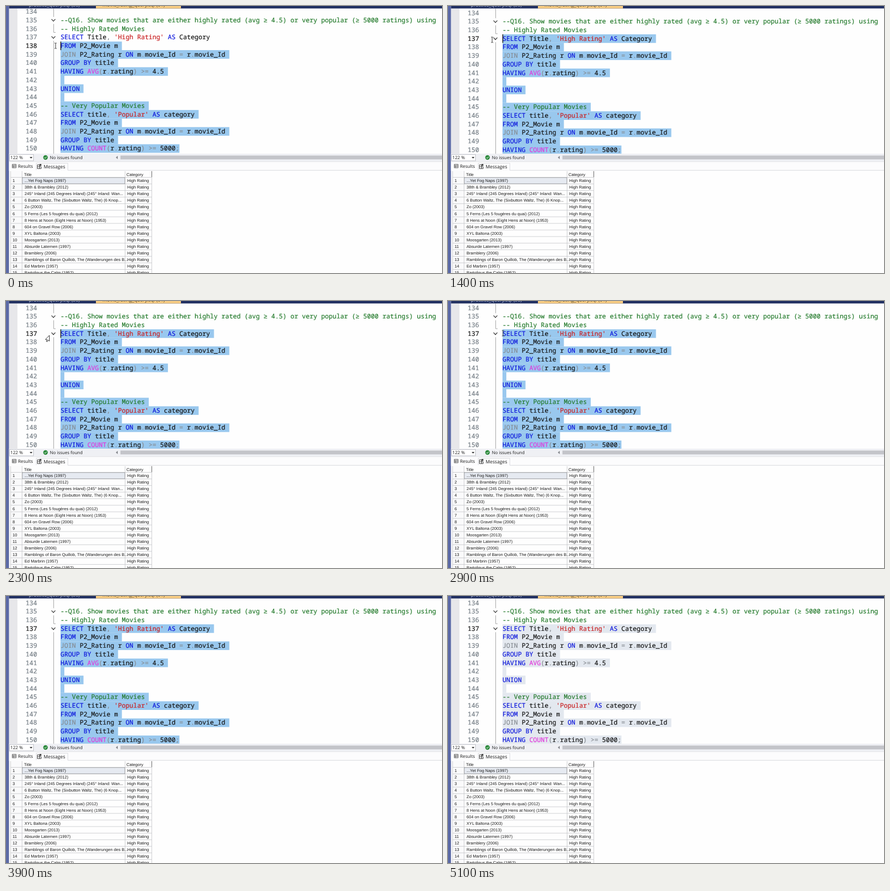
These frames come from a looping animation (800 by 490 pixels, 5.2 s). An HTML page:

```html
<!DOCTYPE html>
<html lang="en">
<head>
<meta charset="utf-8">
<title>Query editor</title>
<style>
html, body { margin: 0; width: 100%; height: 100%; overflow: hidden; background: #fff; }
svg { display: block; width: 800px; height: 490px; }
text { white-space: pre; text-rendering: geometricPrecision; }
.code { font: 500 11.73px "Noto Sans Mono", monospace; stroke-width: .2px; }
.ui { font-family: "Open Sans", sans-serif; fill: #1c1c1c; }
.cell { font: 7.6px "Liberation Sans", Arial, sans-serif; fill: #1a1a1a; }
</style>
</head>
<body>
<svg id="stage" viewBox="0 0 800 490"></svg>
<script>
const LOOP = 5200, ROW = 15.7, CHAR = 7.04, LEFT = 100, FIRST = 134, TOP = 2.45;
const stage = document.getElementById('stage');

const CODE = [
  '',
  '--Q16. Show movies that are either highly rated (avg ≥ 4.5) or very popular (≥ 5000 ratings) using',
  '-- Highly Rated Movies',
  "SELECT Title, 'High Rating' AS Category",
  'FROM P2_Movie m',
  'JOIN P2_Rating r ON m.movie_Id = r.movie_Id',
  'GROUP BY title',
  'HAVING AVG(r.rating) >= 4.5',
  '',
  'UNION',
  '',
  '-- Very Popular Movies',
  "SELECT title, 'Popular' AS category",
  'FROM P2_Movie m',
  'JOIN P2_Rating r ON m.movie_Id = r.movie_Id',
  'GROUP BY title',
  'HAVING COUNT(r.rating) >= 5000;'
];

const TITLES = [
  '...Yet Fog Naps (1997)',
  '38th & Brambley (2012)',
  '245° Inland (245 Degrees Inland) (245° Inland: Wan...',
  '6 Button Waltz, The (Sixbutton Waltz, The) (6 Knop...',
  'Zo (2003)',
  '5 Ferns (Les 5 fougères du quai) (2012)',
  '8 Hens at Noon (Eight Hens at Noon) (1953)',
  '604 on Gravel Row (2006)',
  'XYL Baltona (2003)',
  'Moosgarten (2013)',
  'Absurde Laternen (1997)',
  'Bramblery (2006)',
  'Ramblings of Baron Quillob, The (Wanderungen des B...',
  'Ed Marbrin (1957)',
  'Bartolinus the Calm (1952)'
];

function add(parent, tag, attrs, text) {
  const el = document.createElementNS('http://www.w3.org/2000/svg', tag);
  for (const k in attrs) el.setAttribute(k, attrs[k]);
  if (text !== undefined) el.textContent = text;
  parent.appendChild(el);
  return el;
}
const rect = (p, x, y, width, height, fill, more) =>
  add(p, 'rect', { x, y, width, height, fill, ...more });
const path = (p, d, stroke, more) =>
  add(p, 'path', { d, stroke, fill: 'none', ...more });
const label = (p, x, y, text, cls, more) =>
  add(p, 'text', { x, y, class: cls, ...more }, text);

const rowTop = i => TOP + i * ROW;

// Syntax colouring
const TOKEN = /(--.*)|('[^']*')|\b(SELECT|FROM|ON|AS|GROUP|BY|HAVING|UNION)\b|\b(AVG|COUNT)\b|(\d+\.\d+)|(\bJOIN\b|[.,()=>;]+)/g;
const COLORS = ['#237a2b', '#c92022', '#0c16dc', '#e236dc', '#151515', '#858a90'];

function codeLine(parent, i) {
  const line = CODE[i];
  const el = add(parent, 'text', { x: LEFT, y: rowTop(i) + 11.8, class: 'code' });
  const span = (s, c) => s && add(el, 'tspan', { fill: c, stroke: c }, s);
  let at = 0;
  for (const m of line.matchAll(TOKEN)) {
    span(line.slice(at, m.index), '#151515');
    span(m[0], COLORS[m.slice(1).findIndex(Boolean)]);
    at = m.index + m[0].length;
  }
  span(line.slice(at), '#151515');
}

// Editor
rect(stage, 0, 0, 800, 490, '#fefefe');
const clip = add(add(stage, 'defs', {}), 'clipPath', { id: 'editor' });
rect(clip, 0, 4.5, 800, 266.5);
const editor = add(stage, 'g', { 'clip-path': 'url(#editor)' });
rect(editor, 6, 4, 15, 268, '#e7e7ea');
const sheet = add(editor, 'g', {});

const marks = CODE.map((line, i) => {
  const len = line.length + (i < CODE.length - 1 ? 1 : 0);
  return rect(sheet, LEFT, rowTop(i), len * CHAR, ROW + .1);
});
path(sheet, 'M87.5 0V20M87.5 33V48.5H91M87.5 64V290', '#a6a6a6');
for (const i of [1, 3]) {
  const y = rowTop(i) + 6;
  path(sheet, `M83.5 ${y}l3.5 3.8l3.5 -3.8`, '#333', { 'stroke-width': 1.2 });
}
const numbers = CODE.map((_, i) =>
  label(sheet, 36, rowTop(i) + 11.8, FIRST + i, 'code'));
CODE.forEach((_, i) => codeLine(sheet, i));
const caret = rect(sheet, LEFT - .2, 0, 1.4, ROW, '#111');

// Pointers
const beam = path(editor, 'M-2 -5H-.6L0 -4.4L.6 -5H2M0 -4.4V4.4M-2 5H-.6L0 4.4L.6 5H2', '#333');
const arrow = path(editor, 'M3.6 -6V4.6L1.2 2.6L-.4 5.8L-2 5L-.5 1.9L-3.8 1.7Z', '#222',
  { fill: '#fff', 'stroke-width': .9 });

// Window frame and tab strip
rect(stage, 0, 0, 5.5, 490, '#5b69a5');
rect(stage, 5.5, 0, 794.5, 4.5, '#202f60');
rect(stage, 165, 0, 156, 4.5, '#f6cb82');
label(stage, 42, 1, 'practice_query.sql (58)', 'ui', { 'font-size': 9, style: 'fill:#cdd3e8' });
label(stage, 177, 1, 'movie_rating_query.sql (61)*', 'ui', { 'font-size': 9, style: 'fill:#4a3d22' });

// Status row
rect(stage, 5.5, 271, 794.5, 14.5, '#eff0f4');
rect(stage, 6.5, 272.5, 44, 11.5, '#fff', { stroke: '#b4b6be', 'stroke-width': .8 });
label(stage, 8, 281.3, '122 %', 'ui', { 'font-size': 8.2 });
path(stage, 'M43.5 277H48.5L46 280Z', 'none', { fill: '#333' });
add(stage, 'circle', { cx: 72.5, cy: 278, r: 4.2, fill: '#2c8a3c' });
path(stage, 'M70.4 278.1l1.5 1.6l2.7 -3.2', '#fff', { 'stroke-width': 1 });
label(stage, 80.5, 281.3, 'No issues found', 'ui', { 'font-size': 8 });
path(stage, 'M205 275V281L201.5 278Z', 'none', { fill: '#85878d' });
rect(stage, 210, 274.5, 590, 7, '#c3c4c9');

// Result tabs
rect(stage, 5.5, 285.5, 794.5, 17, '#fcfcfd');
path(stage, 'M5.5 285.7H800', '#d6d8de', { 'stroke-width': .7 });
path(stage, 'M55.5 301V288.5H113.5V301.5H800', '#d4d5da', { 'stroke-width': .8 });
path(stage, 'M11.5 290.5H18.5V297H11.5ZM11.5 292.6H18.5M11.5 294.8H18.5M14 292.6V297', '#444', { 'stroke-width': .8 });
label(stage, 22, 297, 'Results', 'ui', { 'font-size': 8.2 });
path(stage, 'M57.5 291.5H61.5V298.5H57.5ZM57.5 295H64.5V298.5H61.5', '#333', { 'stroke-width': .9 });
rect(stage, 61.5, 290, 3.4, 3.4, '#444');
label(stage, 69, 298, 'Messages', 'ui', { 'font-size': 8.7 });

// Result grid
const CELL = 12.07, GRID = 314.5;
rect(stage, 8, 303, 21, 187, '#fafafb');
rect(stage, 29.5, GRID, 188.5, CELL, '#e6eaf1');
label(stage, 33, 312, 'Title', 'cell');
label(stage, 221, 312, 'Category', 'cell');
path(stage, 'M8.5 303V490M29.5 303V490M218.5 303V490M267.5 314V490', '#c3c4c8', { 'stroke-width': .8 });
path(stage, 'M267.5 303V314', '#555', { 'stroke-width': .9 });
TITLES.forEach((title, i) => {
  const y = GRID + i * CELL, base = y + 8.7;
  path(stage, `M8 ${y}H267.5`, '#c3c4c8', { 'stroke-width': .8 });
  label(stage, 12, base, i + 1, 'cell');
  label(stage, 34, base, title, 'cell');
  label(stage, 222.5, base, 'High Rating', 'cell');
});
rect(stage, 30, GRID + .4, 188, CELL - .8, 'none',
  { stroke: '#444', 'stroke-width': .7, 'stroke-dasharray': '1 1' });

// Pointer path: time, x, y
const MOVES = [
  [0, 91, 73], [100, 91, 73], [700, 91, 19], [800, 91, 19], [1000, 88, 13],
  [1300, 81, 62], [2050, 81, 62], [2250, 76, 69], [2600, 76, 69],
  [3300, 139, 44], [3450, 139, 44], [3800, 175, -14], [LOOP, 175, -14]
];
const SCROLL_AT = 860, RELEASE = 2000, CARET_OFF = 2500, BLUR = 4900;

function pointer(t) {
  const i = MOVES.findIndex((m, k) => k && t < m[0]);
  const [t0, x0, y0] = MOVES[i - 1], [t1, x1, y1] = MOVES[i];
  const p = (t - t0) / (t1 - t0), e = p * p * (3 - 2 * p);
  return [x0 + (x1 - x0) * e, y0 + (y1 - y0) * e];
}

function draw(t) {
  const [x, y] = pointer(t);
  const scroll = t < SCROLL_AT ? 0 : 2.4;
  const start = t < RELEASE ? Math.floor((y - scroll - TOP) / ROW) : 3;
  const fill = t < BLUR ? '#99c8ee' : '#e3e8ef';

  sheet.setAttribute('transform', `translate(0 ${scroll})`);
  marks.forEach((m, i) => m.setAttribute('fill', i >= start ? fill : 'none'));
  numbers.forEach((n, i) => {
    const c = i === start ? '#111' : '#727b83';
    n.setAttribute('fill', c);
    n.setAttribute('stroke', c);
  });
  caret.setAttribute('y', rowTop(start));
  caret.setAttribute('visibility', t < CARET_OFF ? 'visible' : 'hidden');

  const overMargin = t > 2150 && x < 80;
  for (const [el, on] of [[beam, !overMargin], [arrow, overMargin]]) {
    el.setAttribute('transform', `translate(${x} ${y})`);
    el.setAttribute('visibility', on ? 'visible' : 'hidden');
  }
}

const born = performance.now();
function tick() {
  draw((performance.now() - born) % LOOP);
  requestAnimationFrame(tick);
}
tick();
</script>
</body>
</html>
```
